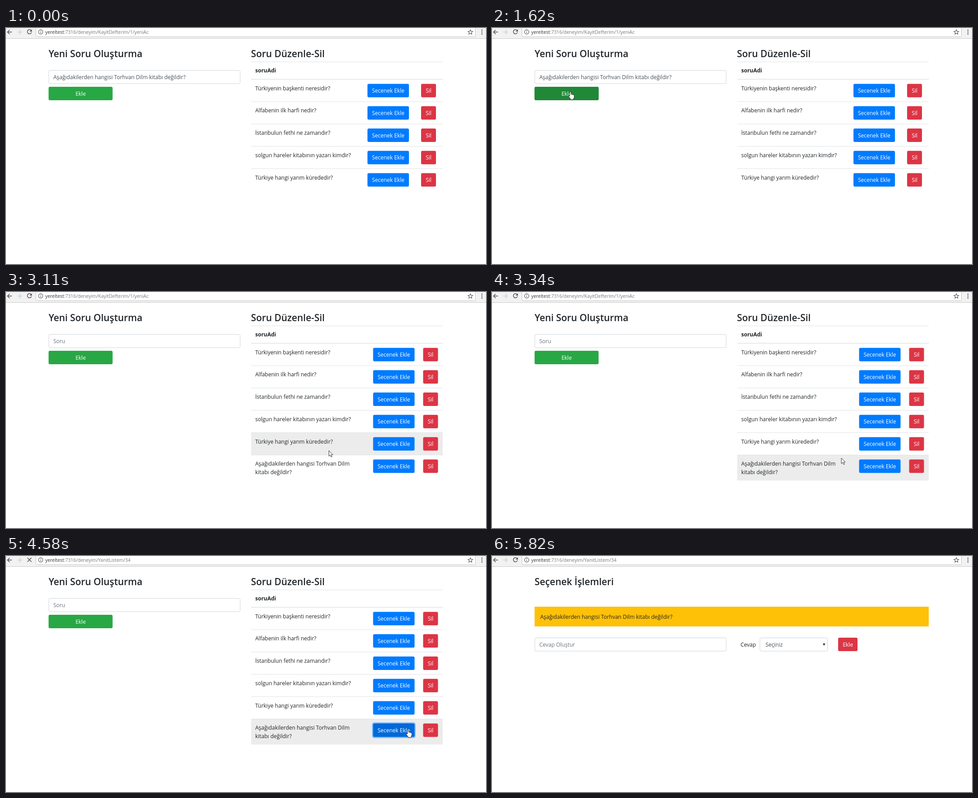
Write an HTML page that moves like this. It is 1065x526 px and loops after 6370 ms.

```html
<!DOCTYPE html>
<html lang="tr">
<head>
<meta charset="utf-8">
<title>Soru</title>
<style>
html, body { margin: 0; width: 100%; height: 100%; overflow: hidden; background: #fff; }
svg { display: block; font: 12px "Open Sans", "Noto Sans", sans-serif; fill: #212529; }
.title { font-size: 20.9px; font-weight: 600; }
.head { font-weight: 700; }
.label { fill: #fff; text-anchor: middle; }
.value { fill: #495057; }
.hint { fill: #6c757d; }
.url { font-size: 10.4px; fill: #777; }
.host { fill: #333; }
.field { fill: #fff; stroke: #ced4da; }
.icon { fill: none; stroke: #505050; stroke-width: 1.5; }
.thin { stroke-width: 1.1; }
.line { stroke: #dee2e6; }
</style>
</head>
<body>
<svg id="stage" width="1065" height="526" viewBox="0 0 1065 526"></svg>
<script>
const LOOP = 6370, STEP = 73;
const RELOAD = 2650, OPEN = 4500, SECOND_PAGE = 5430, GONE = 5820;
const BLUE = '#007bff', RED = '#dc3545', GREEN = '#28a745';
const QUESTION = 'Aşağıdakilerden hangisi Torhvan Dilm kitabı değildir?';
const ROWS = ['Türkiyenin başkenti neresidir?', 'Alfabenin ilk harfi nedir?', 'İstanbulun fethi ne zamandır?',
  'solgun hareler kitabının yazarı kimdir?', 'Türkiye hangi yarım kürededir?', 'Aşağıdakilerden hangisi Torhvan Dilm'];

const rowTop = i => 114.5 + i * 49.75;
const text = (x, y, s, cls = '') => `<text x="${x}" y="${y}" class="${cls}">${s}</text>`;
const rect = (x, y, w, h, fill, extra = '') => `<rect x="${x}" y="${y}" width="${w}" height="${h}" fill="${fill}" ${extra}/>`;
const field = (x, y, w) => `<rect x="${x}" y="${y}" width="${w}" height="29.5" rx="3" class="field"/>`;
const line = (y, width = 1) => `<path d="M544 ${y}H969" class="line" stroke-width="${width}"/>`;
const button = (x, y, w, s, fill, over = '') =>
  rect(x, y, w, 30, fill, 'rx="3"') + over + text(x + w / 2, y + 19.7, s, 'label');
// Focus ring and darker face, both faded in by opacity
const states = (id, x, y, w, ring, dark) =>
  rect(x - 1.2, y - 1.2, w + 2.4, 32.4, 'none', `id="${id}Ring" rx="4" stroke="${ring}" stroke-width="2.4" opacity="0"`) +
  rect(x, y, w, 30, dark, `id="${id}Dark" rx="3" opacity="0"`);

const row = (s, i) => {
  const y = rowTop(i), last = i === 5;
  return `<g ${last ? 'id="added"' : ''}>${i ? line(y) : ''}${text(553, y + 24, s)}
    ${last ? text(553, y + 43, 'kitabı değildir?') : ''}
    <g class="add">${button(802, y + 10, 92, 'Secenek Ekle', BLUE, last ? states('blue', 802, y + 10, 92, '#80bdff', '#0069d9') : '')}</g>
    <g class="del">${button(921, y + 10, 33, 'Sil', RED)}</g></g>`;
};

const toolbar = `
  ${rect(0, 0, 1065, 23, '#f2f2f2')}<path d="M0 23.5H1065" stroke="#c8c8c8"/>
  ${rect(66.5, -3, 975, 22.5, '#fff', 'rx="2" stroke="#c4c4c4"')}
  <path class="icon" d="M13 9H3.5M8 4.3L3.3 9L8 13.7"/>
  <path class="icon" style="stroke:#d0d0d0" d="M24.5 9H34M29.5 4.3L34.2 9L29.5 13.7"/>
  <g id="reload"><path class="icon" d="M55.6 5.2A4.7 4.7 0 1 0 56.6 9.6"/><path id="tip" d="M57.5 3V8H52.5Z"/></g>
  <path id="stop" class="icon" d="M47.5 4L56.5 13M56.5 4L47.5 13"/>
  <circle cx="77" cy="8.7" r="4.8" class="icon thin"/>
  <path class="icon thin" d="M77 8V11.5M77 5.7V7"/>
  <text x="87" y="12.7" class="url"><tspan class="host">yereltest</tspan><tspan id="path"></tspan></text>
  <path class="icon thin" d="M1030.300 3.800l1.500 3.500 3.800.3-2.900 2.500.9 3.700-3.300-2-3.300 2 .9-3.700-2.900-2.500 3.800-.3Z"/>
  <g fill="#505050"><circle cx="1056" cy="4.800" r="1.300"/><circle cx="1056" cy="9" r="1.300"/><circle cx="1056" cy="13.200" r="1.300"/></g>`;

const firstPage = `<g id="first">
  ${text(94.5, 64.5, 'Yeni Soru Oluşturma', 'title')}
  ${field(95, 94.5, 424.5)}
  <text id="entry" x="105" y="113.5"></text>
  ${button(94.5, 131, 142, 'Ekle', GREEN, states('green', 94.5, 131, 142, '#93d3a2', '#218838'))}
  ${text(543.5, 64.5, 'Soru Düzenle-Sil', 'title')}
  ${rect(544, 0, 425, 49.75, '#ececec', 'id="hover"')}
  ${line(75.5)}${text(553, 99.3, 'soruAdi', 'head')}${line(114.3, 1.6)}
  ${ROWS.map(row).join('')}</g>`;

const secondPage = `<g id="second">
  ${text(94.5, 64.5, 'Seçenek İşlemleri', 'title')}
  ${rect(94.5, 113, 874.5, 44, '#ffc107')}${text(107, 139.5, QUESTION)}
  ${field(95, 182.5, 424.5)}${text(105, 202, 'Cevap Oluştur', 'hint')}
  ${text(551.5, 202, 'Cevap')}
  ${field(594.5, 182.5, 150)}${text(607, 202.3, 'Seçiniz', 'value')}
  <path d="M734 195H739.5L736.7 200Z"/>
  ${button(768, 182, 43, 'Ekle', RED)}</g>`;

const cursor = `<g id="cursor" fill="#fff" stroke="#222" stroke-width=".9" stroke-linejoin="round">
  <path id="arrow" d="M.5.5V13L3.4 10.3L5.3 15L7.4 14.1L5.5 9.6H9.2Z"/>
  <path id="hand" d="M-1.5 10V1.5Q-1.4.3-.2.3T1.2 1.5V6Q2.5 4.9 3.7 6.3Q5 5.5 6.2 6.9Q8.3 6.6 8.4 8.5V12.5L6.8 15.5V17.7H.3V16L-4 10.5Q-4.6 8.6-2.8 8.9Z"/></g>`;

const $ = id => document.getElementById(id);
$('stage').innerHTML = toolbar + firstPage + secondPage + cursor;

// Cursor strokes: start time, steps, bend point, end point
const START = [1141, 419];
const STROKES = [
  [460, 3, 845, 421, 523, 302],
  [770, 3, 358, 440, 194, 199],
  [1250, 5, 186, 166, 174, 142],
  [2890, 4, 445, 248, 716, 353],
  [3340, 3, 804, 378, 892, 402],
  [3650, 7, 892, 388, 892, 387],
  [4980, 4, 905, 420, 923, 464],
  [5280, 5, 966, 483, 1009, 502],
  [5670, 3, 1018, 516, 1035, 540]
];

function cursorAt(t) {
  let [x, y] = START;
  for (const [begin, steps, bx, by, ex, ey] of STROKES) {
    if (t < begin) break;
    const p = Math.min(1, (Math.floor((t - begin) / STEP) + 1) / steps), q = 1 - p;
    x = q * q * x + 2 * q * p * bx + p * p * ex;
    y = q * q * y + 2 * q * p * by + p * p * ey;
  }
  return [x, y];
}

const ramp = (t, begin, length) => Math.max(0, Math.min(1, (t - begin) / length));
const show = (id, on) => $(id).style.display = on ? '' : 'none';
const opacity = (id, v) => $(id).setAttribute('opacity', v);
const shift = (cls, dx) => document.querySelectorAll(cls).forEach(g => g.setAttribute('transform', `translate(${dx})`));

function draw(t) {
  const added = t >= RELOAD, second = t >= SECOND_PAGE;
  const loading = t >= 2260 && t < RELOAD || t >= OPEN && t < SECOND_PAGE;
  const [x, y] = cursorAt(t);
  const inside = (l, top, r, bottom) => x > l && x < r && y > top && y < bottom;

  show('first', !second);
  show('second', second);
  show('added', added);
  show('reload', !loading);
  show('stop', loading);
  const tint = added && t < OPEN ? '#624064' : '#505050';
  $('reload').firstChild.style.stroke = $('tip').style.fill = tint;
  $('path').textContent = t < OPEN ? ':7316/deneyim/KayitDefterim/1/yeniAc' : ':7316/deneyim/YanitListem/34';
  $('entry').textContent = added ? 'Soru' : QUESTION;
  $('entry').setAttribute('class', added ? 'hint' : 'value');
  shift('.add', added ? 12.5 : 0);
  shift('.del', added ? 4.5 : 0);

  const i = Math.min(5, Math.floor((y - rowTop(0)) / 49.75));
  show('hover', added && inside(544, rowTop(0), 969, 420));
  $('hover').setAttribute('y', rowTop(i));
  $('hover').setAttribute('height', i === 5 ? 57 : 49.75);

  opacity('greenDark', added ? 0 : ramp(t, 1400, 150));
  opacity('greenRing', added ? 0 : ramp(t, 2260, 150));
  opacity('blueDark', ramp(t, 3400, 80) * (1 - ramp(t, 4980, 150)));
  opacity('blueRing', ramp(t, OPEN, 80));

  const hand = !second && (inside(94, 131, 237, 161) || added && inside(814, 373, 907, 403));
  show('cursor', t >= 460 && t < GONE);
  show('arrow', !hand);
  show('hand', hand);
  $('cursor').setAttribute('transform', `translate(${x} ${y})`);
}

const origin = performance.now();
function tick() {
  draw((performance.now() - origin) % LOOP);
  requestAnimationFrame(tick);
}
tick();
</script>
</body>
</html>
```
